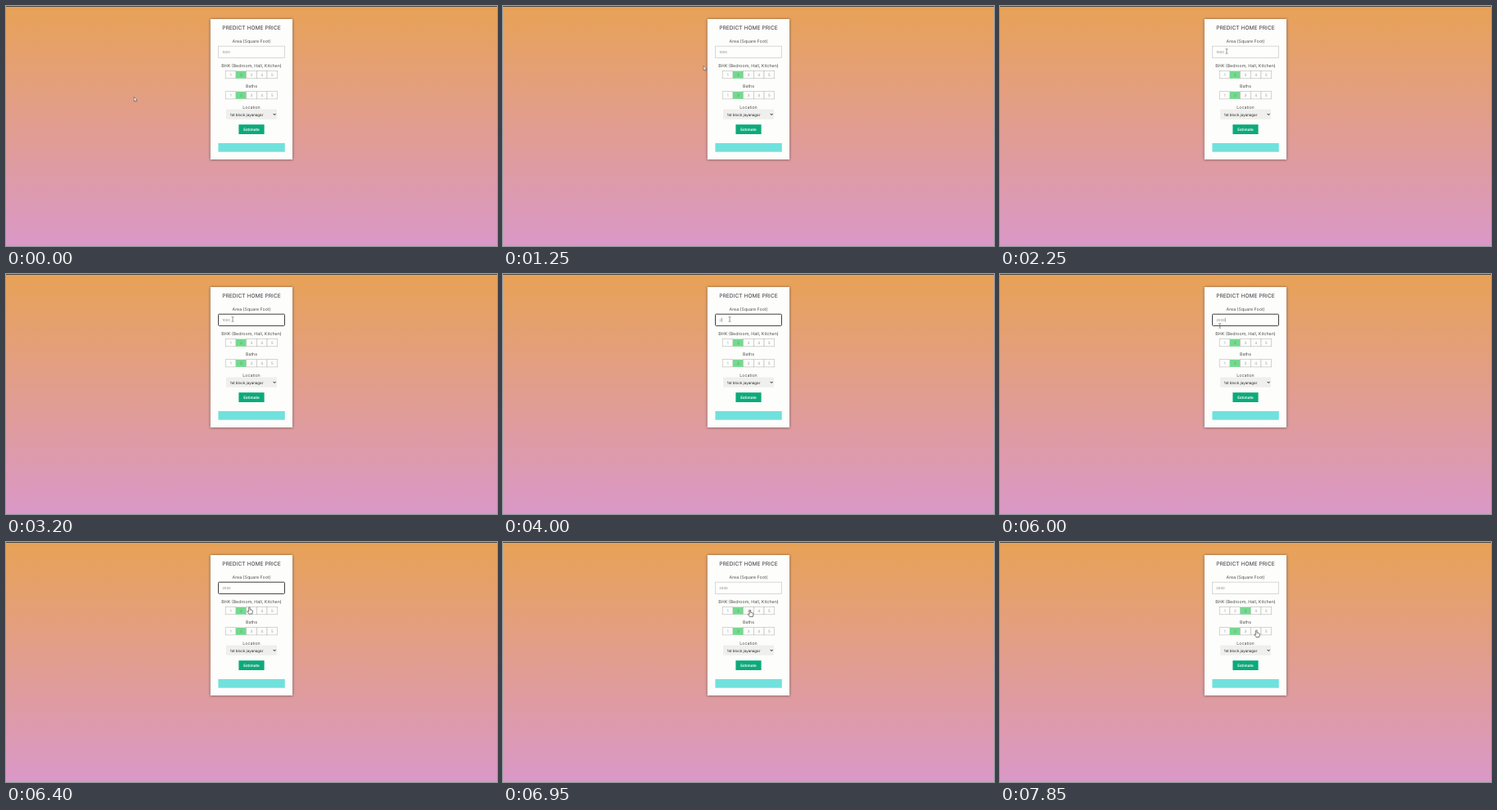
These frames come from a looping animation (600 by 294 pixels, 8 s). An HTML page:

```html
<!DOCTYPE html>
<html lang="en">
<head>
<meta charset="utf-8">
<title>Predict home price</title>
<style>
  html, body { margin: 0; width: 100%; height: 100%; overflow: hidden; }
  svg { display: block; width: 100%; height: 100%; }
  text { font-family: Inter, "Open Sans", sans-serif; font-size: 5.25px; fill: #505050; text-anchor: middle; text-rendering: geometricPrecision; }
  .left { text-anchor: start; }
</style>
</head>
<body>
<svg id="stage" viewBox="0 0 600 294" xmlns="http://www.w3.org/2000/svg">
  <defs>
    <linearGradient id="sky" x1="0" y1="0" x2="0" y2="1">
      <stop offset="0" stop-color="#e8a256"/>
      <stop offset="1" stop-color="#da98c8"/>
    </linearGradient>
    <filter id="blur" x="-10%" y="-10%" width="120%" height="120%">
      <feGaussianBlur stdDeviation="1.6"/>
    </filter>
  </defs>
  <rect width="600" height="294" fill="url(#sky)"/>
  <rect width="600" height="1" fill="#454545"/>
  <rect x="249.6" y="16" width="100.8" height="172.4" fill="#333" opacity=".65" filter="url(#blur)"/>
  <rect x="249.8" y="16" width="100.3" height="172" fill="#fdfdfb"/>

  <text x="300" y="29" style="font-size:6.7px;fill:#3c3c44">PREDICT HOME PRICE</text>
  <text x="300" y="44.6">Area (Square Foot)</text>
  <text x="300" y="74.6" style="font-size:5.3px">BHK (Bedroom, Hall, Kitchen)</text>
  <text x="300" y="100">Baths</text>
  <text x="300" y="125.5">Location</text>

  <rect id="field" x="259.5" y="49.2" width="81" height="14.2" fill="#fefefd"/>
  <text id="area" class="left" x="264.2" y="58" style="font-size:4.2px;fill:#858585"></text>
  <rect id="caret" y="53.6" width=".5" height="5.2" fill="#555"/>

  <g id="bhk"></g>
  <g id="baths"></g>

  <rect x="269" y="126.5" width="62" height="12.3" rx="1.2" fill="#efefed"/>
  <text class="left" x="273.8" y="134.6" style="font-size:4.5px;fill:#222">1st block jayanagar</text>
  <path d="M326.7 131.9l1.5 1.6 1.5-1.6" fill="none" stroke="#222" stroke-width="1"/>

  <rect x="284.4" y="145.2" width="31.2" height="11.8" fill="#0caa7b"/>
  <text x="300" y="152.9" style="font-size:4.7px;font-weight:600;fill:#fff">Estimate</text>
  <rect x="259.4" y="168" width="81.4" height="10.7" fill="#70e1dd"/>

  <g id="pointer" stroke-linejoin="round">
    <path id="arrow" d="M-.6-.4v5.4l1.2-1.1.9 1.9.9-.5-.8-1.7h1.7z" fill="#fff" stroke="#444" stroke-width=".55"/>
    <path id="beam" d="M-1.4-2.9q1 0 1.4.5.4-.5 1.4-.5M0-2.4v4.8M-1.4 2.9q1 0 1.4-.5.4.5 1.4.5" fill="none" stroke="#444" stroke-width=".55"/>
    <path id="hand" d="M-.8.2Q0-.6.7.2v2.7l2.5.7q.8.3.7 1.2l-.6 3.4h-3.7l-2.3-3q.2-1 1.1-.6l.8.7z" fill="#fff" stroke="#444" stroke-width=".7"/>
  </g>
</svg>
<script>
const LOOP = 8000;
const FOCUS = 2300, BLUR = 6930, PICK = 7040;

// time, x, y of the pointer
const path = [
  [0, 157, 111.8], [850, 157, 111.8], [1250, 245.6, 73.9], [1650, 276, 58],
  [2100, 277, 55.4], [5800, 277, 55.4], [6000, 268.6, 63.3], [6450, 301, 82],
  [6800, 302, 83.4], [7100, 302, 83.4], [7750, 313.5, 108.3], [LOOP, 313.5, 108.3]
];
// time and content of the area field after each key
const keys = [
  [0, '1000'], [3500, '100'], [3575, '10'], [3650, '1'], [3800, ''],
  [3950, '2'], [4150, '20'], [4650, '200'], [4840, '2000']
];

const $ = id => document.getElementById(id);
const set = (el, attrs) => { for (const k in attrs) el.setAttribute(k, attrs[k]); };
const show = (id, on) => set($(id), { visibility: on ? 'visible' : 'hidden' });

function add(parent, tag, attrs) {
  const el = document.createElementNS('http://www.w3.org/2000/svg', tag);
  set(el, attrs);
  parent.append(el);
  return el;
}

function makeSwitch(id, y) {
  const cells = [];
  for (let i = 0; i < 5; i++) {
    const x = 268.2 + i * 12.7;
    const box = add($(id), 'rect', { x, y, width: 12.7, height: 9.2, 'stroke-width': .6 });
    const label = add($(id), 'text', { x: x + 6.35, y: y + 6.2 });
    label.textContent = i + 1;
    label.style.fontSize = '4.5px';
    cells.push({ box, label });
  }
  return choice => cells.forEach(({ box, label }, i) => {
    const on = i + 1 === choice;
    set(box, { fill: on ? '#74d98f' : '#fdfdfb', stroke: on ? 'none' : '#b8b8b8' });
    label.style.fill = on ? '#579b69' : '#999';
  });
}
const setBhk = makeSwitch('bhk', 79.6);
const setBaths = makeSwitch('baths', 104.7);

function pointerAt(t) {
  const i = path.findIndex(p => p[0] > t);
  const [t0, x0, y0] = path[i - 1], [t1, x1, y1] = path[i];
  const u = (t - t0) / (t1 - t0);
  return [x0 + (x1 - x0) * u, y0 + (y1 - y0) * u];
}

function pointerKind(x, y) {
  if (x > 259 && x < 341 && y > 48 && y < 64.2) return 'beam';
  if (x > 268 && x < 332 && (y > 79 && y < 89 || y > 104 && y < 114)) return 'hand';
  return 'arrow';
}

function draw(t) {
  const focused = t >= FOCUS && t < BLUR;
  const [typed, value] = keys.filter(k => k[0] <= t).pop();
  set($('field'), focused
    ? { stroke: '#3f3f3f', 'stroke-width': 1, rx: 1 }
    : { stroke: '#cfcfcf', 'stroke-width': .8, rx: 0 });

  const area = $('area');
  area.textContent = value;
  set($('caret'), { x: 264.4 + (value ? area.getComputedTextLength() : 0) });
  show('caret', focused && (t - Math.max(typed, FOCUS)) % 1000 < 500);

  setBhk(t < PICK ? 2 : 3);
  setBaths(2);

  const [x, y] = pointerAt(t), kind = pointerKind(x, y);
  set($('pointer'), { transform: `translate(${x} ${y})` });
  for (const id of ['arrow', 'beam', 'hand']) show(id, id === kind);
}

const start = performance.now();
function tick() {
  draw((performance.now() - start) % LOOP);
  requestAnimationFrame(tick);
}
tick();
</script>
</body>
</html>
```
